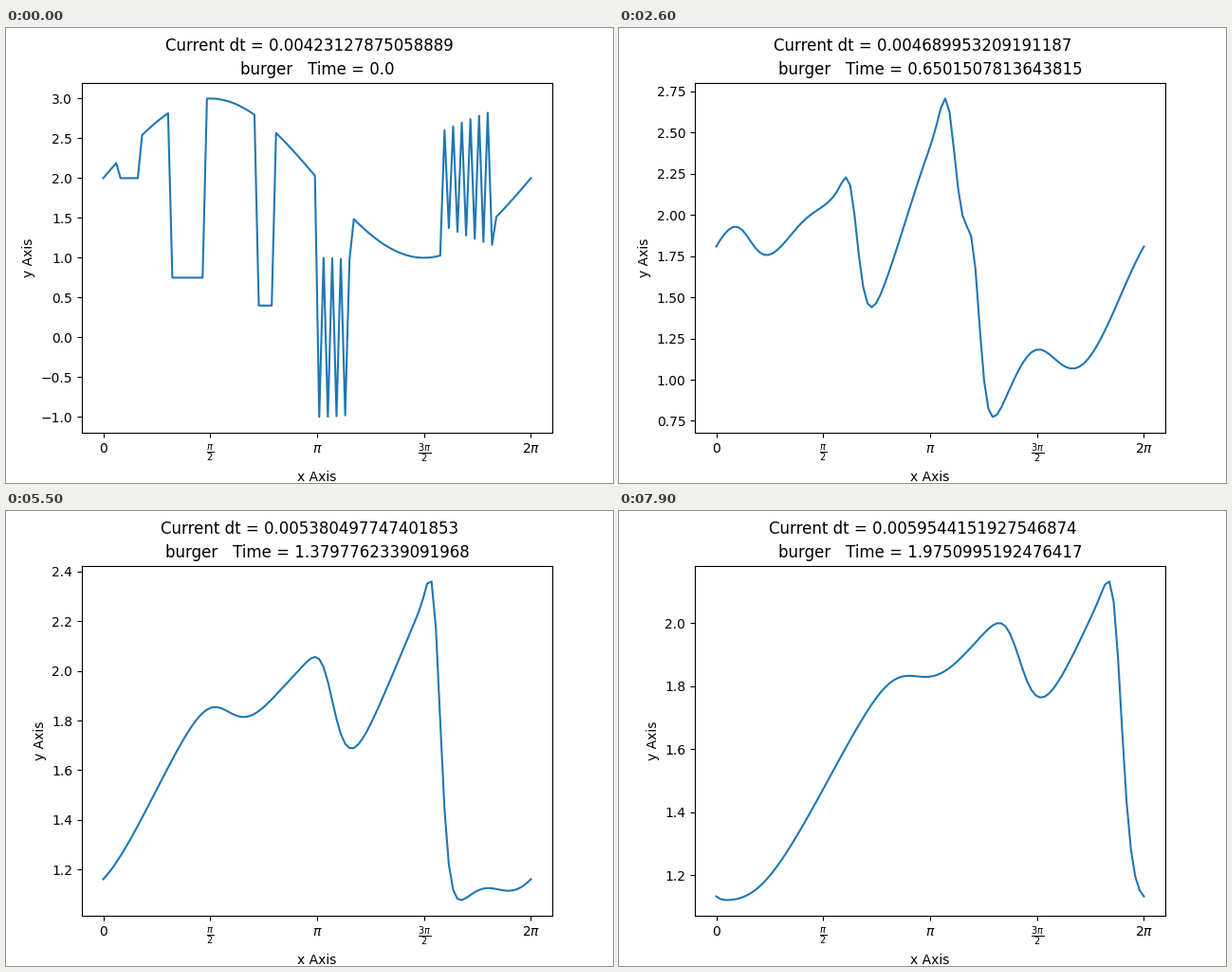
Animation of 640x480 px, one loop 8000 ms. Source, as a matplotlib script:

```python
import numpy as np
import matplotlib.pyplot as plt
from matplotlib.animation import FuncAnimation

N = 100            # grid points, both ends of the period included
NU = 0.05          # viscosity
CFL = 0.2
FRAMES = 80
FRAME_DT = 0.025   # simulated time between frames

x = np.linspace(0, 2 * np.pi, N)
dx = x[1] - x[0]


def initial():
    """Shifted sine with flat steps and two bands of grid-scale spikes."""
    u = 2 + np.sin(x)
    u[4:9] = 2
    u[16:24] = 0.75
    u[36:40] = 0.4
    u[50:58] = -np.sin(50 * x[50:58])
    u[79:91] = 2 + np.sin(50 * x[79:91] + 1.28)
    return u


def time_step(u):
    return CFL * dx / np.max(np.abs(u))


def burger(u, dt):
    """One explicit central-difference step of the viscous Burgers equation."""
    v = u[:-1]
    left, right = np.roll(v, 1), np.roll(v, -1)
    convection = v * (right - left) / (2 * dx)
    diffusion = NU * (right - 2 * v + left) / dx**2
    v = v + dt * (diffusion - convection)
    return np.append(v, v[0])


def simulate():
    u, t = initial(), 0.0
    dt = time_step(u)
    states = []
    for k in range(FRAMES):
        while t < k * FRAME_DT:
            u = burger(u, dt)
            t += dt
            dt = time_step(u)
        states.append((u, float(t), float(dt)))
    return states


states = simulate()

fig, ax = plt.subplots(figsize=(6.4, 4.8), dpi=100)
line, = ax.plot(x, states[0][0])
header = fig.suptitle("")
ax.set_xlabel("x Axis")
ax.set_ylabel("y Axis")
ax.set_xticks(np.arange(5) * np.pi / 2,
              ["0", r"$\frac{\pi}{2}$", r"$\pi$", r"$\frac{3\pi}{2}$", r"$2\pi$"])


def update(k):
    u, t, dt = states[k]
    line.set_ydata(u)
    ax.relim()
    ax.autoscale_view()
    header.set_text(f"Current dt = {dt}")
    ax.set_title(f"burger   Time = {t}")
    return line,


anim = FuncAnimation(fig, update, frames=FRAMES, interval=100, repeat=True)
plt.show()
```
